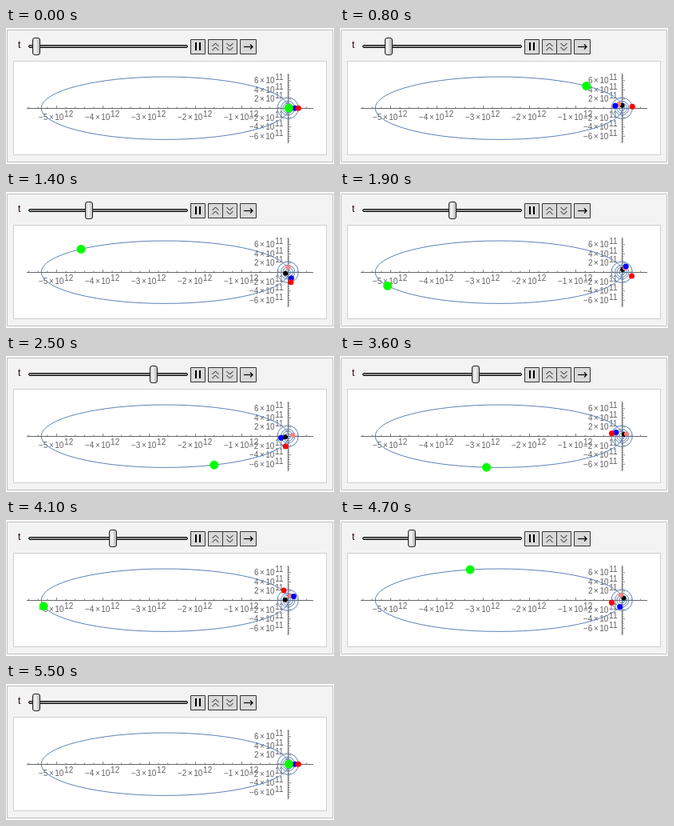
Recreate the animation shown at these times as an HTML page with a canvas. Size 411 by 170 pixels, loop 6000 ms.

```html
<!DOCTYPE html>
<html>
<head>
<meta charset="utf-8">
<style>
html, body { margin: 0; width: 411px; height: 170px; overflow: hidden; background: #fff; }
canvas { display: block; }
</style>
</head>
<body>
<canvas id="stage" width="411" height="170"></canvas>
<script>
const ctx = document.getElementById('stage').getContext('2d');
const FONT = 'px "Liberation Sans", Arial, sans-serif';
const AXIS = { x: 353.5, y: 100.5 };
const SUN = { x: 353.2, y: 100.2 };
const UNIT = 58;            // pixels per 10^12 m
const EARTH_STEP = 1103.1;  // degrees the Earth moves per step
const COMET = { cx: 199.2, a: 155, b: 39.2, period: 75.5 };
const PLANETS = [
  { r: 3.4, period: 0.2408, color: '#000', size: 3 },
  { r: 6.3, period: 0.6152, color: '#ff8080', size: 3 },
  { r: 8.7, period: 1, color: '#00f', size: 3.5 },
  { r: 13.2, period: 1.881, color: '#f00', size: 3.5 }
];

function line(color, width, ...points) {
  ctx.beginPath();
  for (let i = 0; i < points.length; i += 2) ctx.lineTo(points[i], points[i + 1]);
  ctx.strokeStyle = color;
  ctx.lineWidth = width;
  ctx.stroke();
}

function box(x, y, w, h, fill, stroke, radius = 0) {
  ctx.beginPath();
  ctx.roundRect(x, y, w, h, radius);
  ctx.fillStyle = fill;
  ctx.fill();
  ctx.strokeStyle = stroke;
  ctx.lineWidth = 1;
  ctx.stroke();
}

function orbit(cx, rx, ry) {
  ctx.beginPath();
  ctx.ellipse(cx, SUN.y, rx, ry, 0, 0, 2 * Math.PI);
  ctx.strokeStyle = '#5e81b5';
  ctx.lineWidth = 1;
  ctx.stroke();
}

function dot(cx, rx, ry, angle, size, color) {
  ctx.beginPath();
  ctx.arc(cx + rx * Math.cos(angle), SUN.y - ry * Math.sin(angle), size, 0, 2 * Math.PI);
  ctx.fillStyle = color;
  ctx.fill();
}

// n × 10^power, with its left edge at x
function label(n, power, x, y) {
  ctx.font = 10 + FONT;
  ctx.fillStyle = '#606060';
  for (const [part, gap] of [[n < 0 ? '−' + -n : '' + n, 1.5], ['×', 1.5], ['10', 0.7]]) {
    ctx.fillText(part, x, y);
    x += ctx.measureText(part).width + gap;
  }
  ctx.fillText(power, x, y - 4);
}

function drawControls(u) {
  box(1.5, 2.5, 408, 165, '#f3f3f3', '#bfbfbf');
  box(9.5, 41.5, 392, 117, '#fff', '#cfcfcf');
  ctx.font = 12 + FONT;
  ctx.fillStyle = '#300018';
  ctx.fillText('t', 15, 25);

  box(28.5, 21.5, 199, 3, '#888', '#111', 1.5);
  const x = 38 + 7.32 * u;
  const shade = ctx.createLinearGradient(x - 5, 0, x + 5, 0);
  shade.addColorStop(0, '#c0c0c0');
  shade.addColorStop(0.4, '#f6f6f6');
  shade.addColorStop(1, '#a8a8a8');
  box(Math.round(x) - 4.5, 12.5, 9, 21, shade, '#222', 2.5);

  for (const [left, width] of [[231.5, 18], [253.5, 18], [271.5, 18], [293.5, 20]])
    box(left, 14.5, width, 18, '#d9d9d9', '#333');
  line('#000', 2, 238, 18, 238, 28);
  line('#000', 2, 243, 18, 243, 28);
  for (const y of [19, 24]) {
    line('#111', 1, 258.5, y + 4, 262.5, y, 266.5, y + 4);
    line('#111', 1, 276.5, y, 280.5, y + 4, 284.5, y);
  }
  line('#000', 1.2, 298, 23.5, 309, 23.5);
  line('#000', 1.2, 306, 20.5, 309, 23.5, 306, 26.5);
}

function drawAxes() {
  const color = '#666';
  line(color, 1, 26, AXIS.y, 385, AXIS.y);
  line(color, 1, AXIS.x, 57, AXIS.x, 144);
  for (let i = -28; i <= 2; i++) {
    const x = AXIS.x + i * UNIT / 5;
    line(color, 0.8, x, AXIS.y, x, AXIS.y - (i % 5 ? 2 : 3.5));
  }
  for (let i = -14; i <= 14; i++) {
    const y = AXIS.y - i * UNIT / 20;
    line(color, 0.8, AXIS.x, y, AXIS.x + (i % 4 ? 2 : 3.5), y);
  }
  for (let n = -5; n < 0; n++) label(n, '12', Math.round(AXIS.x + n * UNIT - 22.5), 115);
  for (const n of [6, 4, 2, -2, -4, -6])
    label(n, '11', n < 0 ? 305 : 311, Math.round(AXIS.y - n * UNIT / 10 + 3.5));
}

function draw(now) {
  const tick = Math.floor(now % 6000 / 100);
  const step = Math.max(0, Math.min(tick - 4, 55 - tick));
  const u = Math.max(0, step - 0.917);
  const angle = period => EARTH_STEP * u / period * Math.PI / 180;

  ctx.clearRect(0, 0, 411, 170);
  drawControls(u);
  drawAxes();
  orbit(COMET.cx, COMET.a, COMET.b);
  for (const p of PLANETS) orbit(SUN.x, p.r, p.r);
  for (const p of PLANETS) dot(SUN.x, p.r, p.r, angle(p.period), p.size, p.color);
  dot(COMET.cx, COMET.a, COMET.b, angle(COMET.period), 5.5, '#0f0');
  requestAnimationFrame(draw);
}
requestAnimationFrame(draw);
</script>
</body>
</html>
```
